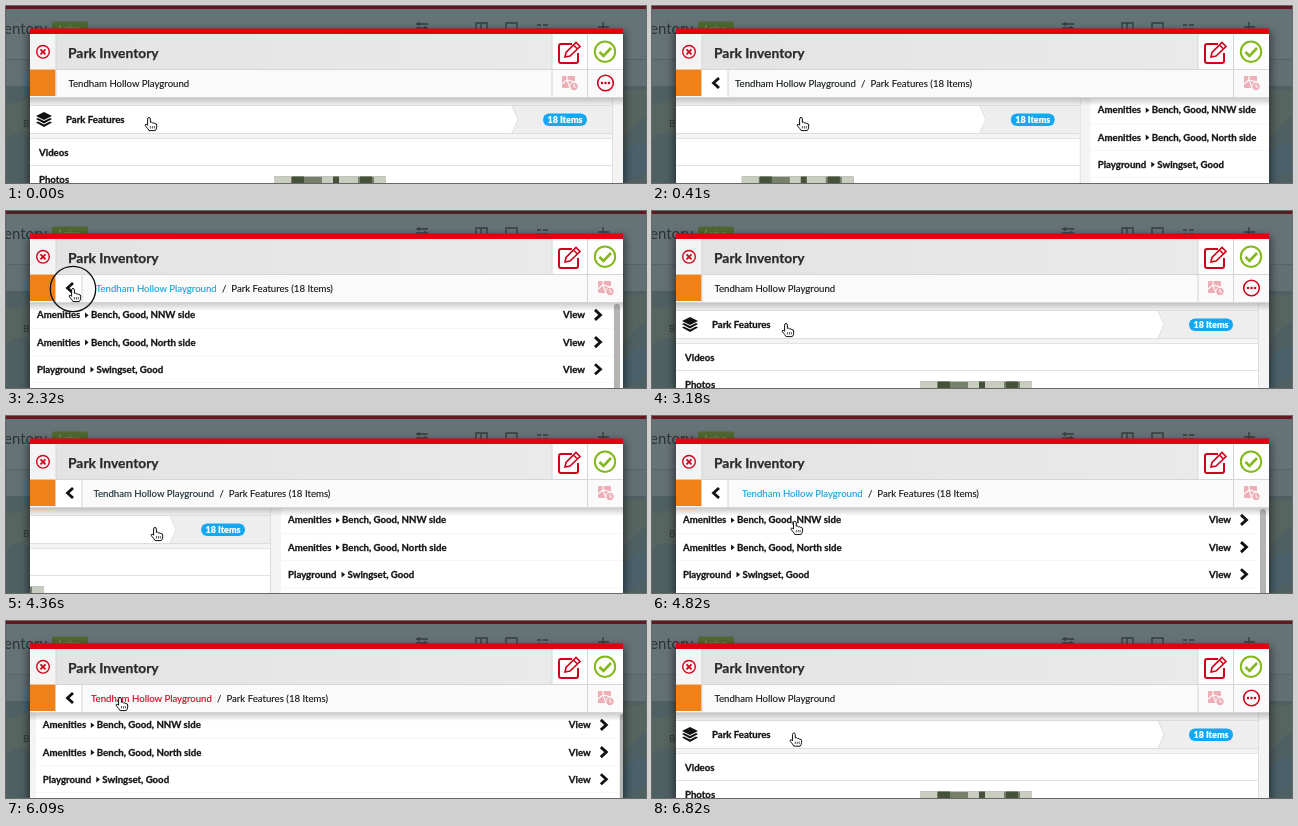
An HTML page that plays this animation: 640x177 px, repeating every 6870 ms.

```html
<!DOCTYPE html>
<html lang="en">
<head>
<meta charset="utf-8">
<title>Park Inventory</title>
<style>
  html, body { margin: 0; width: 100%; height: 100%; overflow: hidden; background: #667376; }
  svg { display: block; width: 640px; height: 177px; }
  text { font: 9.65px Lato, sans-serif; fill: #151515; stroke: #151515; stroke-width: .12; white-space: pre; }
  .bold { font-weight: 700; stroke-width: .3; }
  .title { font-weight: 700; font-size: 13.85px; fill: #2a2a2a; stroke: #2a2a2a; stroke-width: .25; }
  .behind { stroke: none; }
  .line { stroke: #d6d6d6; fill: none; }
  .red { stroke: #d0021b; fill: none; }
  .dim { stroke: #353f42; fill: none; stroke-width: 1.4; }
</style>
</head>
<body>
<svg viewBox="0 0 640 177">
  <defs>
    <linearGradient id="shade" x2="0" y2="1">
      <stop offset="0" stop-opacity=".2"/><stop offset="1" stop-opacity="0"/>
    </linearGradient>
    <linearGradient id="bar">
      <stop offset="0" stop-color="#e3e3e3"/><stop offset="1" stop-color="#ebebeb"/>
    </linearGradient>
    <filter id="soft" x="-10%" y="-10%" width="120%" height="120%"><feGaussianBlur stdDeviation="4"/></filter>
    <clipPath id="body"><path d="M24 92H617V177H24Z"/></clipPath>
    <g id="mapIcon" opacity=".3">
      <rect x="-8" y="-7" width="13" height="12" rx="1" fill="#d0021b"/>
      <path d="M-8 1L-3-3L5-1M-3-7V-3L0 5" fill="none" stroke="#fff" stroke-width="1.2"/>
      <circle cx="4" cy="3.5" r="4.2" fill="#d0021b" stroke="#fff"/>
      <path d="M4 1V4H6" fill="none" stroke="#fff"/>
    </g>
    <path id="chevron" d="M3-5L-2.5 0L3 5" fill="none" stroke="#111" stroke-width="2.8"/>
  </defs>

  <!-- dimmed page behind the dialog -->
  <path d="M0 0H640V53H0Z" fill="#667376"/>
  <path d="M0 0H640V3H0Z" fill="#651620"/>
  <path d="M0 53H640V80H0Z" fill="#626f73"/>
  <path d="M0 53.5H640" stroke="#566367"/>
  <path d="M0 80H640V177H0Z" fill="#4f6063"/>
  <path d="M0 96Q12 100 24 90V130Q10 122 0 134ZM617 84H640V110Q628 118 617 134Z" fill="#576561"/>
  <path d="M617 150Q630 132 640 138V164L617 177Z" fill="#4a606a"/>
  <text x="-2" y="27.5" class="behind" style="font-size:15px;fill:#2c3437">entory</text>
  <rect x="46" y="15.5" width="36" height="14" rx="2" fill="#4e6930"/>
  <text x="51" y="25.5" class="behind" style="font-size:8.5px;fill:#7d8c66">Active</text>
  <text x="17" y="121" class="behind" style="fill:#2f3a3c">B</text>
  <path d="M410 18H422M410 22H422M413 16V20M419 20V24M470 17H481V25H470ZM475 17V25M500 17H511V25H500ZM531 19H535M537 19H542M531 23H535M537 23H542M592 21H603M597 16V25" class="dim"/>

  <!-- dialog -->
  <path d="M22 25H619V181H22Z" opacity=".5" filter="url(#soft)"/>
  <path d="M24 28H617V177H24Z" fill="#fff"/>
  <g clip-path="url(#body)">
    <g id="detail">
      <path d="M24 92H617V177H24Z" fill="#f4f4f4"/>
      <path d="M24 100H606V127H24ZM24 132H606V177H24Z" fill="#fff"/>
      <path d="M506 100H606V127H506L512 113.5Z" fill="#eee"/>
      <path d="M24 99.5H606M24 127.5H606M24 132.5H606M24 159.5H606M606.5 92V177M506 100L512 113.5L506 127" class="line" stroke-opacity=".7"/>
      <g fill="#111">
        <path d="M38 106L46 110L38 114L30 110Z"/>
        <path d="M30 113L32 112L38 115L44 112L46 113L38 117.5ZM30 116.5L32 115.5L38 118.5L44 115.5L46 116.5L38 121Z"/>
      </g>
      <text x="60" y="117" class="bold">Park Features</text>
      <rect x="537" y="107.5" width="44" height="12.5" rx="6.2" fill="#12a8f4"/>
      <text x="559" y="117" text-anchor="middle" style="font-weight:900;font-size:9px;fill:#fff;stroke:#fff">18 Items</text>
      <text x="33" y="150" class="bold">Videos</text>
      <text x="33" y="177" class="bold">Photos</text>
      <path d="M268 170.5H380V177H268Z" fill="#77806a"/>
      <path d="M268 170.5H285V177H268ZM316 170.5H352V177H316ZM368 170.5H380V177H368Z" fill="#c8cdc0"/>
      <path d="M286 170.5H298V177H286ZM327 170.5H333V177H327ZM354 170.5H366V177H354Z" fill="#46513a"/>
    </g>
    <g id="list">
      <path d="M24 92H617V177H24Z" fill="#fff"/>
      <path d="M24 117.5H607M24 144.5H607M24 171.5H607" class="line" stroke-opacity=".2"/>
      <g id="rows"></g>
      <path d="M607 92H617V177H607Z" fill="#fafafa"/>
      <rect x="608" y="93" width="6" height="100" rx="3" fill="#b4b4b4"/>
    </g>
    <path d="M24 92H617V100H24Z" fill="url(#shade)"/>
  </g>
  <path d="M24 28H617V63H24Z" fill="url(#bar)"/>
  <path d="M24 28H50V63H24Z" fill="#f4f4f4"/>
  <path d="M546 28H617V63H546Z" fill="#fdfdfd"/>
  <path d="M24 63H617V92H24Z" fill="#fafafa"/>
  <path d="M24 63.5H49.5V90H24Z" fill="#f08119"/>
  <path d="M24 22.5H617V28H24Z" fill="#e3000f"/>
  <path d="M50 28V91M546 28V63M581.5 28V91M50 63.5H617M24 91.5H617" class="line"/>
  <text x="62" y="51.5" class="title">Park Inventory</text>
  <g class="red">
    <circle cx="37" cy="45.8" r="6.3" stroke-width="1.4"/>
    <path d="M34.5 43.3L39.5 48.3M39.5 43.3L34.5 48.3" stroke-width="1.8"/>
    <path d="M566 38H555Q553 38 553 40V55Q553 57 555 57H570Q572 57 572 55V47" stroke-width="2"/>
    <path d="M559 51L560 46.5L570 36.5L574 40.5L564 50ZM567.5 39L571.5 43" stroke-width="1.6"/>
  </g>
  <g fill="none" stroke="#84b81d" stroke-width="2">
    <circle cx="599" cy="45.7" r="10.2"/><path d="M593.5 46L597.5 50L605 42" stroke-width="2.6"/>
  </g>
  <g id="detailTools">
    <path d="M546 63V91" class="line"/>
    <use href="#mapIcon" x="564" y="77"/>
    <circle cx="599.5" cy="77" r="7.8" class="red" stroke-width="1.6"/>
    <path d="M596 77h.01M599.5 77h.01M603 77h.01" stroke="#d0021b" stroke-width="2.5" stroke-linecap="round"/>
  </g>
  <g id="listTools">
    <path d="M50 64H76V91H50Z" fill="#fff"/><path d="M76 64V91" class="line"/>
    <use href="#chevron" x="64" y="77"/>
    <use href="#mapIcon" x="600" y="77"/>
  </g>
  <g id="crumb">
    <text y="80.5" id="link">Tendham Hollow Playground</text>
    <text x="126" y="80.5" id="tail">/</text>
    <text x="135.3" y="80.5" id="here">Park Features (18 Items)</text>
  </g>

  <circle id="ring" fill="none" stroke="#111" stroke-width="1.3"/>
  <g id="hand" fill="#fff" stroke="#111" stroke-width="1" stroke-linejoin="round">
    <path d="M-1.4 1Q-1.2-.6 0-.6T1.4 1V4.4Q2.8 3.6 3.7 5Q5.2 4.4 5.9 5.7Q7.6 5.3 7.7 7V9Q7.6 11 6.3 12.6H0Q-1 10.5-3.6 7.8Q-4.3 6.4-3 6.2Q-2.2 6.2-1.4 7.3Z"/>
    <path d="M1.4 8V10.5M3.4 8V10.5M5.3 8V10.5" stroke-width=".7"/>
  </g>
  <path id="arrow" d="M0 0V10L2.4 7.8L4 11.4L5.8 10.6L4.2 7.1H7.3Z" fill="#111" stroke="#fff" stroke-width=".8"/>
</svg>
<script>
const LOOP = 6870, WIDTH = 593, SLIDE = 490;
const $ = id => document.getElementById(id);
const clamp = v => Math.max(0, Math.min(1, v));
const inOut = u => (1 - Math.cos(Math.PI * u)) / 2;
const out = u => 1 - (1 - u) ** 3;
const mix = (a, b, u) => a + (b - a) * u;
const set = (id, attrs) => Object.entries(attrs).forEach(([k, v]) => $(id).setAttribute(k, v));
const move = (id, x, y = 0) => set(id, { transform: `translate(${x} ${y})` });

// start time of each page change, and whether it opens the list
const slides = [[230, true], [2490, false], [4092, true], [6060, false]];
const clicks = [40, 2180, 3850, 5790];
// time, x, y of the pointer tip
const path = [
  [0, 143, 112], [120, 149, 112], [560, 149, 112], [1000, 118, 87], [1450, 108, 87],
  [2050, 67, 78], [2640, 67, 78], [3180, 134, 113], [3590, 149, 112], [4620, 149, 112],
  [5350, 114, 77], [6200, 114, 77], [6780, 141, 113], [LOOP, 143, 112]
];

const rows = [
  ['Amenities', 79, 'Bench, Good, NNW side'],
  ['Amenities', 79, 'Bench, Good, North side'],
  ['Playground', 84.5, 'Swingset, Good']
];
$('rows').innerHTML = rows.map(([kind, x, label], i) => {
  const y = 107.4 + 27.2 * i;
  return `<text class="bold" x="31" y="${y}">${kind}</text>
    <path d="M${x} ${y - 6}l3.6 2.8l-3.6 2.8z" fill="#151515"/>
    <text class="bold" x="${x + 6}" y="${y}">${label}</text>
    <text class="bold" x="557" y="${y}">View</text>
    <use href="#chevron" transform="translate(592 ${y - 3.5}) scale(-1 1)"/>`;
}).join('');

function pointer(t) {
  const i = path.findIndex((p, n) => n && p[0] >= t);
  const [a, b] = [path[i - 1], path[i]];
  const u = inOut((t - a[0]) / (b[0] - a[0]));
  return [mix(a[1], b[1], u), mix(a[2], b[2], u)];
}

function draw(t) {
  let u = 1, opening = false;
  for (const [start, opens] of slides) {
    if (t >= start) { u = clamp((t - start) / SLIDE); opening = opens; }
  }
  const shown = e => opening ? e : 1 - e;
  const page = shown(inOut(u));
  const head = shown(out(u));
  const tint = opening ? u ** 3 : (1 - u) ** 4;
  move('detail', -WIDTH * page);
  move('list', WIDTH * (1 - page));

  const listed = clamp(head * 1.6 - .2);
  set('listTools', { opacity: listed });
  set('detailTools', { opacity: 1 - listed });
  for (const id of ['tail', 'here']) set(id, { opacity: listed });
  move('crumb', mix(62.5, 90, head));

  const [x, y] = pointer(t);
  const onList = page > .98;
  const onLink = onList && x > 92 && x < 212 && y > 70 && y < 84;
  const onBack = x > 50 && x < 78 && y > 63;
  const color = [20, 165, 224].map(c => Math.round(mix(20, c, tint)));
  $('link').style.fill = $('link').style.stroke = onLink ? '#d0021b' : `rgb(${color})`;

  const hand = !onList || onLink || onBack || y > 94;
  set('hand', { opacity: +hand });
  set('arrow', { opacity: +!hand });
  move('hand', x, y);
  move('arrow', x, y);

  const age = t - (clicks.findLast(c => c <= t) ?? -LOOP);
  set('ring', {
    cx: x, cy: y, r: mix(9, 22.7, out(clamp(age / 120))),
    opacity: clamp(age / 40) * clamp((260 - age) / 70)
  });
}

const begin = performance.now();
function tick() {
  draw((performance.now() - begin) % LOOP);
  requestAnimationFrame(tick);
}
draw(0);
requestAnimationFrame(tick);
</script>
</body>
</html>
```
